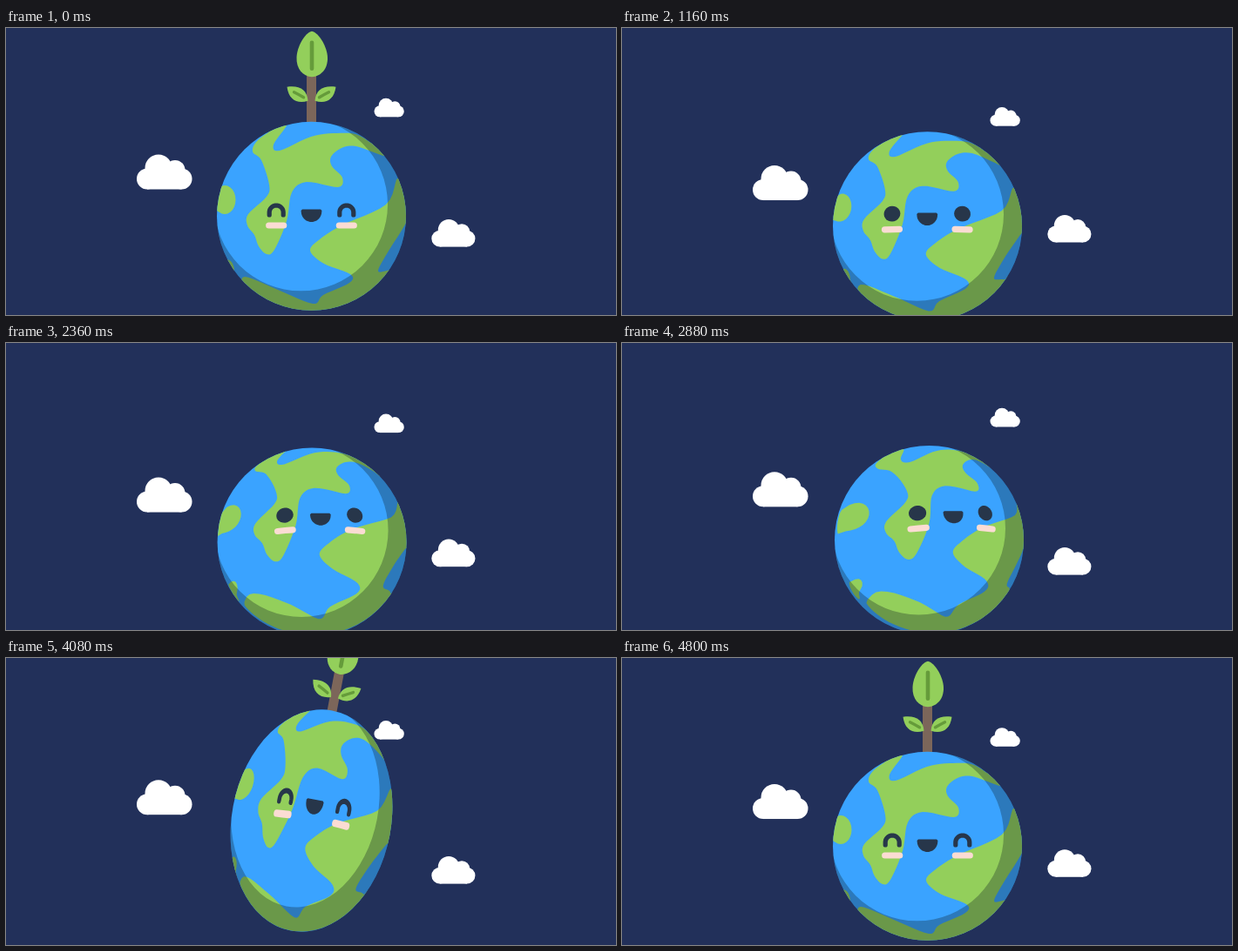
An HTML page with a canvas that plays this animation: 700x330 px, repeating every 4840 ms.

```html
<!DOCTYPE html>
<html lang="en">
<head>
<meta charset="utf-8">
<title>Little planet</title>
<style>
html, body { margin: 0; width: 100%; height: 100%; overflow: hidden; background: #22305a; }
canvas { display: block; }
</style>
</head>
<body>
<canvas id="stage" width="700" height="330"></canvas>
<script>
const ctx = document.getElementById('stage').getContext('2d');
const LOOP = 4840, R = 108.5, HOME = { x: 350.5, y: 216.3 };
const BLUE = '#3aa3ff', GREEN = '#93cf5b', VEIN = '#659b3a', INK = '#27364a', BLUSH = '#fbdcd3';

// Cyclic track: monotone cubic through [time, value] keys, the first key at 0.
function track(...keys) {
  const n = keys.length;
  const at = i => {
    const turn = Math.floor(i / n), k = keys[i - turn * n];
    return [k[0] + turn * LOOP, k[1]];
  };
  const rate = i => (at(i + 1)[1] - at(i)[1]) / (at(i + 1)[0] - at(i)[0]);
  const slope = i => {
    const a = rate(i - 1), b = rate(i);
    return a * b <= 0 ? 0 : 2 * a * b / (a + b);
  };
  return t => {
    let i = n - 1;
    while (keys[i][0] > t) i--;
    const [t0, v0] = at(i), [t1, v1] = at(i + 1);
    const d = t1 - t0, u = (t - t0) / d, w = 1 - u;
    return v0 * w * w * (1 + 2 * u) + v1 * u * u * (3 - 2 * u)
      + d * u * w * (slope(i) * w - slope(i + 1) * u);
  };
}

const centerX = track([0, 350.5], [1200, 350.5], [1800, 349.5], [2880, 352.5], [3400, 350.5]);
const centerY = track([0, 216.3], [160, 216.3], [420, 218.5], [740, 189.3], [1080, 229], [1360, 222.5], [1800, 222.5],
  [2300, 229], [2880, 226.5], [3640, 217], [3840, 227], [4080, 187], [4180, 182], [4440, 221], [4620, 214.5], [4780, 216.3]);
const stretch = track([0, 1], [3400, 1], [3640, 0.973], [3840, 0.9], [4080, 1.187], [4440, 0.97], [4620, 1.01], [4780, 1]);
const roll = track([0, 0], [3700, 0], [4080, 0.185], [4320, -0.06], [4540, 0.02], [4760, 0]);
const yaw = track([0, 0], [1140, 0], [1500, -0.27], [2100, -0.27], [2520, 0.27], [3020, 0.27], [3380, 0]);
const pitch = track([0, 0], [400, 0], [740, 0.125], [1080, 0.05], [1500, 0.24], [3020, 0.24], [3400, 0], [3840, 0],
  [4080, 0.12], [4400, 0]);
const sink = track([0, 0], [400, 2], [720, -9], [1060, 125], [3900, 125], [4080, 9], [4220, -6], [4460, 3], [4780, 0]);

const wave = (mid, size, start) => t => mid + size * Math.sin((t - start) / LOOP * 2 * Math.PI);
const bigCloudY = wave(149.7, 9.6, 350);
const smallCloudY = wave(80.7, 10.4, 0);
const rightCloudY = track([0, 220], [720, 218.3], [1440, 213.5], [1800, 215.3], [2880, 235], [3260, 237], [3640, 235], [4080, 228]);

// Outlines at rest, in stage pixels; points past the rim lie on the far side.
const north = smooth('283,142 289,129 313,113 322,112 307,134 314,141 350,125 380,121 406,124 435,147 402,136 385,138 373,148 374,159'
  + ' 386,172 381,183 345,177 328,189 322,222 308,255 299,260 290,251 285,238 277,227 278,214 299,194 302,180 293,152');
const south = smooth('450,172 463,196 463,215 455,231 438,258 427,279 437,279 450,276 432,300 400,322 350,334 300,322'
  + ' 274,302 274,286 312,301 352,317 364,307 394,293 395,283 365,271 349,256 360,243 385,227 436,203');
const lands = [north, south, arc(251, 197.5, 12.5, 16.5, 0, 2 * Math.PI), arc(253, 279, 9, 13, 0, 2 * Math.PI)];

// Closed Catmull-Rom curve, sampled.
function smooth(outline) {
  const pts = outline.split(' ').map(p => p.split(',').map(Number));
  const out = [], n = pts.length, steps = 6;
  for (let i = 0; i < n; i++) {
    const [a, b, c, d] = [n - 1, 0, 1, 2].map(k => pts[(i + k) % n]);
    for (let s = 0; s < steps; s++) {
      const u = s / steps;
      out.push([0, 1].map(k => b[k] + u / 2 * (c[k] - a[k]
        + u * (2 * a[k] - 5 * b[k] + 4 * c[k] - d[k] + u * (3 * (b[k] - c[k]) + d[k] - a[k])))));
    }
  }
  return out;
}

function arc(cx, cy, rx, ry, from, to) {
  return Array.from({ length: 25 }, (_, i) => {
    const a = from + (to - from) * i / 24;
    return [cx + rx * Math.cos(a), cy + ry * Math.sin(a)];
  });
}

// Place a rest-pose point on the ball, turn the ball, and look at it from the front.
function project([px, py], turn, tilt) {
  const x0 = px - HOME.x, y0 = py - HOME.y;
  const len = Math.hypot(x0, y0) || 1, d = len / R;
  const angle = d < 1 ? Math.asin(d) : Math.PI / 2 + d - 1;
  const out = R * Math.sin(angle) / len;
  const x = x0 * out, y = y0 * out, z = R * Math.cos(angle);
  const y1 = y * Math.cos(tilt) - z * Math.sin(tilt);
  const z1 = z * Math.cos(tilt) + y * Math.sin(tilt);
  const x1 = x * Math.cos(turn) + z1 * Math.sin(turn);
  const z2 = z1 * Math.cos(turn) - x * Math.sin(turn);
  const push = z2 < 0 ? R * 1.02 / Math.hypot(x1, y1) : 1;
  return [x1 * push, y1 * push];
}

function disc(x, y, r) {
  ctx.beginPath();
  ctx.arc(x, y, r, 0, 2 * Math.PI);
}

function drawFace(t, trace) {
  const fill = pts => { trace(pts); ctx.closePath(); ctx.fillStyle = INK; ctx.fill(); };
  const line = (pts, width, color = INK) => {
    trace(pts);
    ctx.lineWidth = width;
    ctx.strokeStyle = color;
    ctx.stroke();
  };
  const mood = t < 1100 || t >= 3940 ? 'happy' : t < 3340 ? 'open' : 'angry';
  for (const side of [-1, 1]) {
    const x = HOME.x + side * 40.3;
    line([[x - 8.5, 227], [x, 227], [x + 8.5, 227]], 7.2, BLUSH);
    if (mood === 'happy') line([[x - 8, 215], ...arc(x, 212, 8, 8, Math.PI, 2 * Math.PI), [x + 8, 215]], 5.2);
    if (mood === 'open') fill(arc(x, 209, 9.4, 9, 0, 2 * Math.PI));
    if (mood === 'angry') line([[HOME.x + side * 50, 204.7], [HOME.x + side * 27, 213.8]], 6);
  }
  if (mood === 'angry') {
    line([[339.5, 222], ...arc(HOME.x, 220, 8, 7.5, 1.15 * Math.PI, 1.85 * Math.PI), [361.5, 222]], 5.4);
  } else {
    fill([[340, 208.5], [361, 208.5], [362.5, 210], ...arc(HOME.x, 211, 11.8, 12, 0, Math.PI), [338.5, 210]]);
  }
}

function drawEarth(t) {
  const turn = yaw(t), tilt = pitch(t);
  const trace = pts => {
    ctx.beginPath();
    for (const p of pts) ctx.lineTo(...project(p, turn, tilt));
  };
  ctx.save();
  disc(0, 0, R);
  ctx.fillStyle = BLUE;
  ctx.fill();
  ctx.clip();
  ctx.fillStyle = GREEN;
  for (const land of lands) {
    trace(land);
    ctx.fill();
  }
  disc(0, 0, R + 2);
  ctx.moveTo(87.5, -13.5);
  ctx.arc(-12, -13.5, 99.5, 0, 2 * Math.PI);
  ctx.fillStyle = 'rgba(12, 26, 30, 0.3)';
  ctx.fill('evenodd');
  drawFace(t, trace);
  ctx.restore();
}

function drawLeaf(outline, vein, width) {
  ctx.fillStyle = GREEN;
  ctx.fill(new Path2D(outline));
  ctx.strokeStyle = VEIN;
  ctx.lineWidth = width;
  ctx.stroke(new Path2D(vein));
}

// The plant grows up from its own origin at ground level.
function drawPlant() {
  ctx.fillStyle = '#7c665a';
  ctx.fillRect(-5.5, -56, 11, 76);
  for (const side of [-1, 1]) {
    ctx.save();
    ctx.scale(side, 1);
    drawLeaf('M4 -24 C5 -37 14 -42 28 -40 C26 -25 16 -20 4 -24Z', 'M9 -28 Q14 -31 20 -34', 3.4);
    ctx.restore();
  }
  drawLeaf('M0.5 -104 C9 -102 18 -86 18.5 -74 C19 -61 11 -52 0.5 -51.5 C-10 -52 -17.5 -61 -17 -74 C-16.5 -86 -8 -102 0.5 -104Z',
    'M0.5 -91 V-61', 4.6);
}

function drawCloud(x, y, scale) {
  ctx.save();
  ctx.translate(x, y);
  ctx.scale(scale, scale);
  ctx.fillStyle = '#fff';
  for (const [cx, cy, r] of [[12, 28, 12], [25, 15.5, 15.5], [44, 18, 11.5], [51.5, 28, 12]]) {
    disc(cx, cy, r);
    ctx.fill();
  }
  ctx.fillRect(12, 18, 39.5, 22);
  ctx.restore();
}

function draw(t) {
  const tall = stretch(t);
  ctx.fillStyle = '#22305a';
  ctx.fillRect(0, 0, 700, 330);
  ctx.lineCap = ctx.lineJoin = 'round';

  ctx.save();
  ctx.translate(centerX(t), centerY(t));
  ctx.rotate(roll(t));
  ctx.save();
  ctx.translate(0, sink(t) - R * tall);
  drawPlant();
  ctx.restore();
  ctx.scale(1 / tall, tall);
  drawEarth(t);
  ctx.restore();

  drawCloud(150, bigCloudY(t), 1);
  drawCloud(422.5, smallCloudY(t), 0.54);
  drawCloud(488.3, rightCloudY(t), 0.79);
}

let start;
function tick(now) {
  start ??= now;
  draw((now - start) % LOOP);
  requestAnimationFrame(tick);
}
draw(0);
requestAnimationFrame(tick);
</script>
</body>
</html>
```
